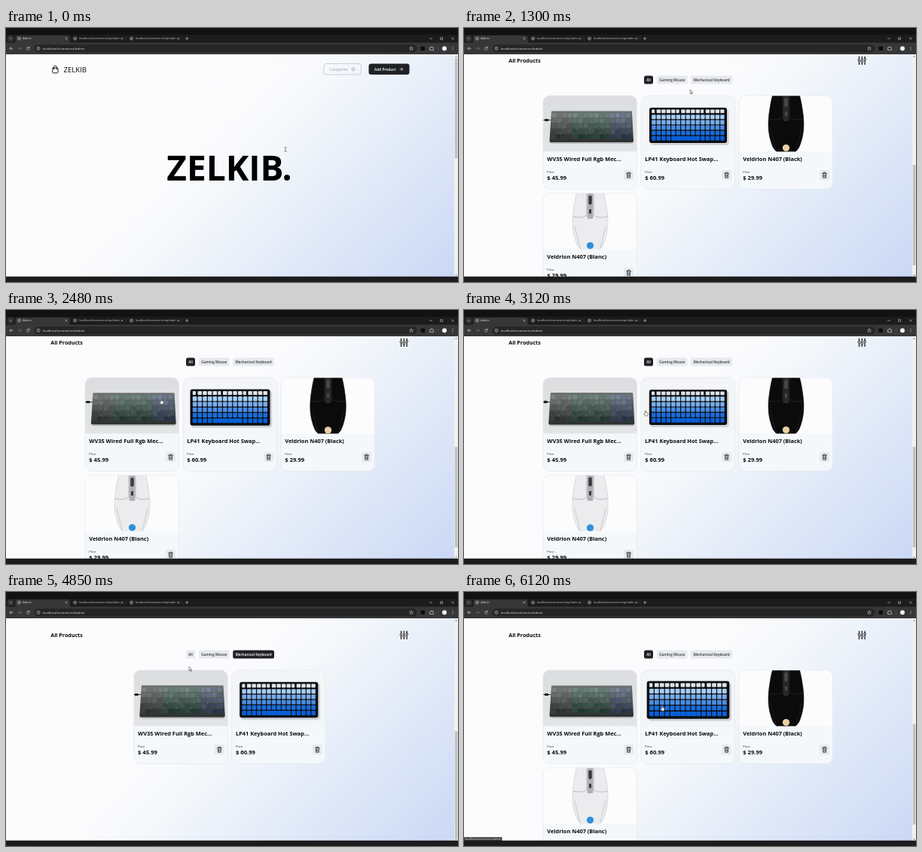
Animation of 600 by 338 pixels, one loop 6.15 s. Source, as an HTML page:

```html
<!DOCTYPE html>
<html lang="en">
<head>
<meta charset="utf-8">
<title>Admin</title>
<style>
html, body { margin: 0; width: 100%; height: 100%; overflow: hidden; background: #1c1c1d; }
svg { display: block; }
text { font-family: "Open Sans", "Noto Sans", sans-serif; white-space: pre; }
</style>
</head>
<body>
<svg id="stage" width="100%" height="100%" viewBox="0 0 600 338"></svg>
<script>
const LOOP = 6150;
const CARD = 124.5, IMAGE_H = 74.5, STEP = 130;
const DARK = [31, 33, 36], PALE = [230, 233, 238], WHITE = [255, 255, 255], INK = [52, 55, 60];

const clamp = v => Math.max(0, Math.min(1, v));
const smooth = u => u * u * (3 - 2 * u);
const mix = (a, b, p) => `rgb(${a.map((v, i) => Math.round(v + (b[i] - v) * p))})`;
const range = n => [...Array(n).keys()];

const rect = (x, y, w, h, fill, rx = 0, more = '') =>
  `<rect x="${x}" y="${y}" width="${w}" height="${h}" rx="${rx}" fill="${fill}" ${more}/>`;
const circle = (x, y, r, fill, more = '') => `<circle cx="${x}" cy="${y}" r="${r}" fill="${fill}" ${more}/>`;
const line = (d, stroke, width, more = '') =>
  `<path d="${d}" fill="none" stroke="${stroke}" stroke-width="${width}" stroke-linecap="round" stroke-linejoin="round" ${more}/>`;
const text = (x, y, size, fill, str, weight = 400, more = '') =>
  `<text x="${x}" y="${y}" font-size="${size}" font-weight="${weight}" fill="${fill}" ${more}>${str}</text>`;
const group = (id, body) => `<g id="${id}">${body}</g>`;

// Product pictures, drawn in a 124.5 x 74.5 box
function greyKeyboard() {
  const rows = range(5).map(r => range(15).map(c => {
    const width = 105 + r * 1.1, pitch = width / 15;
    const x = 64.3 - width / 2 + c * pitch, y = 23.5 + r * 7;
    const wide = r === 4 && c > 3 && c < 9;
    const shade = 128 - r * 17 - (c * 7 + r * 5) % 4 * 5;
    const glow = c > 10 ? [-8, 4, 26] : c > 3 ? [-14, 10, 0] : [0, 2, 2];
    return rect(x, y, wide ? pitch + .2 : pitch - 1.1, 5.4,
      `rgb(${glow.map(g => shade + g)})`, .8);
  }).join('')).join('');
  const lights = range(22).map(i =>
    circle(18 + i * 4.4, 29.5 + i * 3 % 4 * 7, .6, i > 14 ? '#5f9fe0' : '#6fc39a', 'opacity=".8"')).join('');
  return rect(0, 0, CARD, IMAGE_H, 'url(#greyShot)') +
    line('M0 32.5H10', '#2a2c2d', 1) + rect(2, 31, 5, 3, '#1d1f20', .8) +
    rect(9, 56, 111, 8, '#8d8f91', 3, 'opacity=".5"') +
    '<path d="M11 21.5Q11 20.5 12 20.5H117Q118 20.5 118 21.5L120 60Q120 62 118 62H10Q8.500 62 8.500 60Z" fill="url(#greyBody)"/>' +
    rows + lights;
}

function blueKeyboard() {
  const rows = range(6).map(r => range(15).map(c => {
    const y = 18.3 + r * 7.1, x = 14.2 + c * 6.5;
    if (r === 0) return rect(x, y + .2, c % 5 ? 5.3 : 4, 4.8, '#dfe3e8', .7);
    const space = r === 5 && c > 3 && c < 9;
    return rect(x, y, space ? 6.6 : 5.4, 5.9, mix([166, 205, 243], [8, 96, 216], (r - 1) / 3.4 > 1 ? 1 : (r - 1) / 3.4), .8);
  }).join('')).join('');
  return rect(0, 0, CARD, IMAGE_H, '#f3f5f7') + rect(12.5, 18, 104, 48, '#b9bec6', 4, 'opacity=".6"') +
    rect(11, 16, 103, 47, '#0c0e13', 3) + rows;
}

function mouse(body, edge, groove, wheel, mark) {
  return rect(0, 0, CARD, IMAGE_H, '#fcfcfd') +
    `<path d="M45 -2H80Q83 8 85 24Q88 46 82 63Q78 78 62.500 79Q47 78 43 63Q37 46 40 24Q42 8 45 -2Z" fill="${body}" stroke="${edge}" stroke-width=".7"/>` +
    line('M40 31Q52 34 58 29V0M85 31Q73 34 67 29V0', groove, .8) +
    line('M42 44Q46 60 49 73M83 44Q79 60 76 73', groove, .6) +
    rect(58.5, 0, 8, 34, groove, 2) + rect(60.3, 3, 4.4, 12, wheel, 2) + rect(61, 21, 3, 6, wheel, 1) +
    circle(62.5, 69.5, 4.6, mark);
}

const products = [
  { name: 'WV35 Wired Full Rgb Mec...', price: '45.99', picture: greyKeyboard() },
  { name: 'LP41 Keyboard Hot Swap...', price: '60.99', picture: blueKeyboard() },
  { name: 'Veldrion N407 (Black)', price: '29.99', picture: mouse('#0b0b0c', '#161617', '#27282a', '#48494b', '#ecd0a4') },
  { name: 'Veldrion N407 (Blanc)', price: '29.99', picture: mouse('#ececee', '#cfd0d3', '#aeb0b4', '#38393c', '#2f8fdc') }
];

const trash = rect(107, 99, 13, 13.5, '#e5eaee', 3) +
  line('M110.800 103.300H116.400M112.400 103.300V102.200H114.800V103.300M111.400 103.500L111.700 109.300H115.500L115.800 103.500M112.900 105V108M114.300 105V108', '#2d3033', .8);

const card = (p, i) => group('card' + i,
  rect(0, 0, CARD, CARD, '#f4f8fb', 9) +
  `<g clip-path="url(#cardClip)"><svg width="${CARD}" height="${IMAGE_H}" overflow="hidden">${group('picture' + i, p.picture)}</svg></g>` +
  rect(0, 0, CARD, CARD, 'none', 9, 'stroke="#dfe6ec" stroke-width=".6"') +
  text(5.3, 86.7, 7.4, '#0b0c0d', p.name, 700) +
  text(5.3, 103.3, 4, '#25282b', 'Price') +
  text(5.3, 112.4, 7.6, '#0b0c0d', '$ ' + p.price, 700) + trash);

const filters = [
  { label: 'All', x: 239, w: 12 },
  { label: 'Gaming Mouse', x: 256, w: 40.5 },
  { label: 'Mechanical Keyboard', x: 301.2, w: 54.8 }
];
const filterButton = (f, i) => rect(f.x, 378.5, f.w, 11, '#eee', 2.6, `id="pill${i}"`) +
  text(f.x + f.w / 2, 385.8, 4.7, '#333', f.label, 600, `id="label${i}" text-anchor="middle"`);

const header =
  line('M62.200 53.200H68.600Q69.400 57 69 59Q68.600 59.900 67.500 59.900H63.300Q62.200 59.900 61.800 59Q61.400 57 62.200 53.200ZM63.500 54.800V52.300Q63.700 50.300 65.400 50.300Q67.100 50.300 67.300 52.300V54.800', '#111', 1) +
  text(76.5, 58.7, 9.6, '#0b0b0c', 'ZELKIB', 500) +
  rect(422, 47.5, 49.5, 14.5, 'none', 3.2, 'stroke="#b4bcc6" stroke-width=".7"') +
  text(429.5, 56.5, 4.8, '#a9b3bd', 'Categories', 600) +
  circle(461, 54.8, 2.1, 'none', 'stroke="#a9b3bd" stroke-width=".8"') + circle(461, 54.8, .8, '#a9b3bd') +
  rect(481.5, 47.5, 54, 14.5, '#1f2124', 3.2) +
  text(489, 56.5, 4.8, '#fff', 'Add Product', 600) +
  line('M523.300 54.800H527.300M525.300 52.800V56.800', '#fff', .6);

const sliders = line('M524.500 353V356M524.500 359.500V363.500M528.300 353V358M528.300 361.500V363.500M532.100 353V355M532.100 358.500V363.500', '#111', 1.2) +
  [[524.5, 357.8], [528.3, 359.8], [532.1, 356.8]].map(([x, y]) => circle(x, y, 1.4, '#fff', 'stroke="#111" stroke-width="1"')).join('');

const globe = (x, y = 14) => circle(x, y, 2, 'none', 'stroke="#c8cacc" stroke-width=".6"') +
  line(`M${x - 1.5} ${y - .6}l1.500 .6l-.3 1.500M${x + 1.5} ${y - .8}l-1 .8`, '#c8cacc', .5);
const cross = (x, r = 1.1, y = 14) => line(`M${x - r} ${y - r}l${2 * r} ${2 * r}M${x + r} ${y - r}l${-2 * r} ${2 * r}`, '#d2d3d4', .5);
const sideTab = x => globe(x) + text(x + 5.4, 15.4, 3.75, '#c6c8ca', 'localhost/ecommerce/api/adm…') + cross(x + 62.5);

const browser =
  rect(0, 0, 600, 20.5, '#121213') + rect(0, 9, 600, 11.5, '#1c1c1d') + rect(0, 19.5, 600, 15.5, '#373738') +
  rect(2, 10, 8, 8, '#333435', 2.5) + line('M5 13.500l1.200 1.200l1.200-1.200', '#d2d3d4', .6) +
  '<path d="M11 20Q12.500 20 12.500 18V12.500Q12.500 10 15 10H82Q84.500 10 84.500 12.500V18Q84.500 20 86 20Z" fill="#373738"/>' +
  globe(17.5) + text(22.3, 15.4, 3.75, '#e8e9ea', 'Admin') + cross(80) +
  sideTab(91.6) + sideTab(166.5) + line('M159 12V16M233.500 12V16', '#4a4b4c', .5) +
  line('M238.300 14H241.900M240.100 12.200V15.800', '#d2d3d4', .6) +
  line('M562.500 14H565.500M577 12.800H579.600V15.400H577Z', '#d2d3d4', .6) + cross(593, 1.4) +
  rect(37.5, 22, 508, 10.5, '#262627', 5.2) +
  line('M9.200 27.200H5M6.800 25.400L5 27.200L6.800 29', '#d2d3d4', .7) +
  line('M16 27.200H20.200M18.400 25.400L20.200 27.200L18.400 29', '#77797b', .7) +
  line('M31 26.300A1.900 1.900 0 1 0 31.100 28M31.200 25V26.500H29.700', '#d2d3d4', .6) +
  circle(43, 27.2, 2.1, 'none', 'stroke="#c8cacc" stroke-width=".6"') + line('M43 27V28.400M43 25.900V26', '#c8cacc', .6) +
  text(49, 28.7, 4.15, '#e8e9ea', 'localhost/ecommerce/admin') +
  line('M538 24.800L538.700 26.500L540.500 26.600L539.100 27.800L539.600 29.500L538 28.500L536.400 29.500L536.900 27.800L535.500 26.600L537.300 26.500Z', '#d2d3d4', .5) +
  rect(550.5, 24.5, 5.5, 5.5, '#0d0d0e', 1) +
  line('M563 26H564.300Q564.300 24.700 565.300 24.700Q566.200 24.700 566.200 26H567.300V29.500H563Z', '#d2d3d4', .7) +
  line('M573.500 25V29.500', '#5b5c5d', .5) + circle(582, 27.2, 3, '#f2f3f4') +
  [25.4, 27.2, 29].map(y => circle(593, y, .5, '#d2d3d4')).join('');

const scrollbar = rect(595, 35, 5, 296, '#f1f1f2') +
  '<path d="M596.200 38.600L597.500 36.800L598.800 38.600Z" fill="#777"/>' +
  '<path d="M596.200 328.600L597.500 330.200L598.800 328.600Z" fill="#777"/>' +
  rect(595.8, 40, 3.6, 135, '#bfc0c2', 0, 'id="thumb"');

const pointers =
  group('arrow', '<path d="M0 0V5.300L1.300 4.200L2.200 6.200L3.100 5.800L2.200 3.900H3.900Z" fill="#fff" stroke="#222" stroke-width=".5"/>') +
  group('hand', '<path d="M-.6 .6Q0 -.4 .6 .6V2.800L2.500 3.300Q3.400 3.600 3.200 4.700L2.600 7.200H-.4L-2.300 4.700Q-2.200 3.700 -.6 4.600Z" fill="#fff" stroke="#222" stroke-width=".5"/>') +
  group('beam', line('M-1.200 0H1.200M0 0V5M-1.200 5H1.200', '#333', .55));

const stage = document.getElementById('stage');
stage.innerHTML = `<defs>
  <linearGradient id="sky" gradientUnits="userSpaceOnUse" x1="17" y1="18" x2="463" y2="463">
    <stop offset="0" stop-color="#fdfcfd"/><stop offset=".43" stop-color="#fbfbfd"/>
    <stop offset=".54" stop-color="#f3f7fb"/><stop offset=".76" stop-color="#dfe8f8"/><stop offset="1" stop-color="#cbd8f5"/>
  </linearGradient>
  <linearGradient id="greyShot" x2="0" y2="1"><stop offset="0" stop-color="#dcdddf"/><stop offset="1" stop-color="#e3e4e5"/></linearGradient>
  <linearGradient id="greyBody" x2="0" y2="1"><stop offset="0" stop-color="#6d7473"/><stop offset="1" stop-color="#2b2f30"/></linearGradient>
  <clipPath id="cardClip"><rect width="${CARD}" height="${CARD}" rx="9"/></clipPath>
</defs>` +
  rect(0, 35, 600, 296, 'url(#sky)') +
  group('page', header +
    text(296.5, 203, 46, '#000', 'ZELKIB.', 700, 'text-anchor="middle"') +
    text(59.3, 360.5, 7.1, '#0b0b0c', 'All Products', 700) + sliders +
    filters.map(filterButton).join('') + products.map(card).join('')) +
  scrollbar +
  group('status', rect(-2, 326.3, 52.5, 6, '#3a3b3c', 1) + text(1, 330.2, 3.6, '#e8e9ea', 'localhost/ecommerce/admin')) +
  browser + rect(0, 330.7, 600, 8, '#1c1c1d') + pointers;

const el = {};
stage.querySelectorAll('[id]').forEach(node => el[node.id] = node);

// Chosen filter over time: start, button, visible products
const choices = [
  [-1000, 0, [0, 1, 2, 3]],
  [3310, 1, [2, 3]],
  [4030, 2, [0, 1]],
  [5220, 0, [0, 1, 2, 3]]
];
const choiceIndex = t => choices.findLastIndex(c => t >= c[0]);

const path = [
  [0, 371, 159], [150, 371, 159], [670, 338, 100], [1300, 300, 82], [1850, 392, 112], [2180, 400, 128],
  [2480, 206, 118], [2800, 172, 262], [3060, 232, 150], [3270, 276, 70], [3400, 276, 72], [3960, 303, 84],
  [4170, 303, 84], [4480, 335, 132], [4850, 243, 99.5], [5120, 244, 85], [5350, 244, 85],
  [5700, 262, 140], [6120, 263, 151], [LOOP, 263, 151]
];
function cursorAt(t) {
  const i = Math.max(1, path.findIndex(p => p[0] > t));
  const [t0, x0, y0] = path[i - 1], [t1, x1, y1] = path[i];
  const u = smooth(clamp((t - t0) / (t1 - t0)));
  return [x0 + (x1 - x0) * u, y0 + (y1 - y0) * u];
}

const scrollAt = t => t < choices[1][0] ? 315 * smooth(Math.pow(clamp((t - 100) / 1150), .8)) : 301;

function slot(ids, i) {
  const left = ids.length > 2 ? 105 : 169.7;
  return [left + i % 3 * STEP, 405 + Math.floor(i / 3) * STEP];
}

const inside = (x, y, left, top, w, h) => x >= left && x <= left + w && y >= top && y <= top + h;

function hoveredCard(t) {
  const [x, y] = cursorAt(t), ids = choices[choiceIndex(t)][2];
  const i = ids.findIndex((id, n) => inside(x, y + scrollAt(t), ...slot(ids, n), CARD, CARD));
  return i < 0 ? -1 : ids[i];
}

// Share of the last 300 ms spent over a card
const hoverLevel = (id, t) =>
  range(15).filter(k => t >= k * 20 && hoveredCard(t - k * 20) === id).length / 15;

function show(node, on) { node.setAttribute('visibility', on ? 'visible' : 'hidden'); }

function draw(t) {
  const n = choiceIndex(t), [start, active, ids] = choices[n];
  const scroll = scrollAt(t);
  el.page.setAttribute('transform', `translate(0 ${-scroll})`);

  products.forEach((p, id) => {
    const i = ids.indexOf(id);
    el['card' + id].setAttribute('display', i < 0 ? 'none' : 'inline');
    if (i < 0) return;
    el['card' + id].setAttribute('transform', `translate(${slot(ids, i)})`);
    const zoom = 1 + .065 * smooth(hoverLevel(id, t));
    el['picture' + id].setAttribute('transform', `translate(62.25 37.25) scale(${zoom}) translate(-62.25 -37.25)`);
  });

  const fade = clamp((t - start) / 180);
  filters.forEach((f, i) => {
    const level = i === active ? fade : n && i === choices[n - 1][1] ? 1 - fade : 0;
    el['pill' + i].setAttribute('fill', mix(PALE, DARK, level));
    el['label' + i].setAttribute('fill', mix(INK, WHITE, level));
  });

  const height = ids.length > 2 ? 638 : 597;
  el.thumb.setAttribute('y', 40 + scroll * 288 / height);
  el.thumb.setAttribute('height', 296 * 288 / height);
  show(el.status, t > 5950);

  const [x, y] = cursorAt(t), docY = y + scroll;
  const onButton = filters.some(f => inside(x, docY, f.x, 378.5, f.w, 11));
  const kind = hoveredCard(t) >= 0 || onButton ? 'hand' : inside(x, docY, 211, 157, 171, 60) ? 'beam' : 'arrow';
  for (const name of ['arrow', 'hand', 'beam']) {
    show(el[name], name === kind);
    el[name].setAttribute('transform', `translate(${x} ${y})`);
  }
}

const begin = performance.now();
function tick() {
  draw((performance.now() - begin) % LOOP);
  requestAnimationFrame(tick);
}
tick();
</script>
</body>
</html>
```
